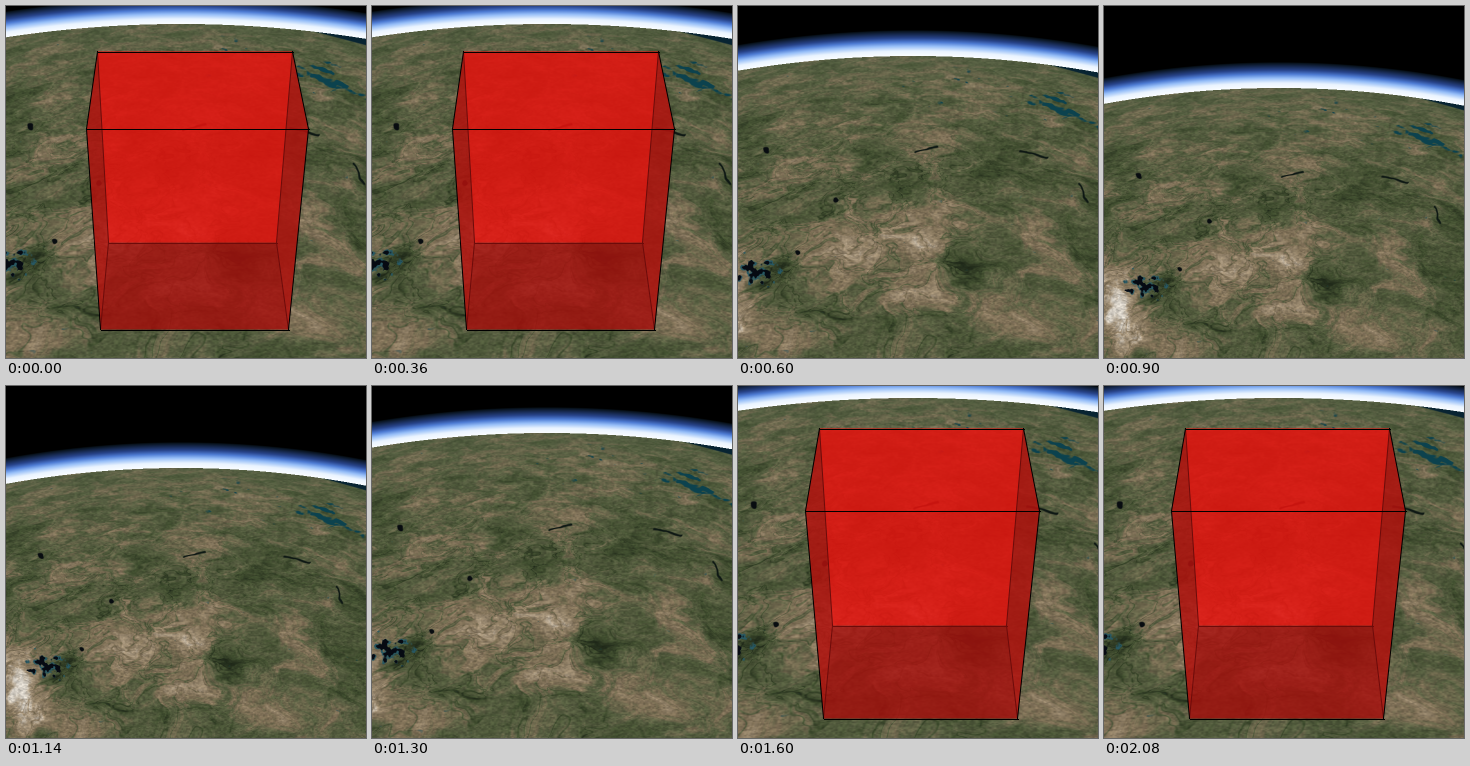
Write a matplotlib script that moves like this. It is 360 by 352 pixels and loops after 2.4 s.

```python
import numpy as np
import matplotlib.pyplot as plt
from matplotlib.animation import FuncAnimation
from matplotlib.patches import Polygon

W, H, DPI = 360, 352, 100
STEP, LOOP = 100, 2400
SS = 2  # supersampling

# camera holds: start ms, horizon height, depth scale, spread, spread per row
VIEWS = [(0, 18, .904, 1.026, -.00048),
         (600, 50, 1, 1, 0),
         (900, 82, 1.08, .95, .00105),
         (1300, 47, .99, 1, 0),
         (1600, 12, .87, .993, -.0006)]
BASE = VIEWS[1]

# box edges running across the screen: y, left x, right x
# (top back, top front, bottom front, bottom back)
BOXES = {0: [(45, 91, 286), (122.5, 80, 302), (323, 94, 282), (236, 102, 270)],
         4: [(42, 81, 285), (124.5, 67, 301), (332, 85, 279), (239, 94, 268)]}

# ground regions: x, y, half width, half height
DRY = [(60, 165, 45, 10), (185, 205, 40, 10), (115, 240, 45, 18),
       (195, 240, 40, 14), (62, 335, 32, 16), (180, 290, 35, 10),
       (290, 315, 45, 22)]
LUSH = [(40, 270, 13, 45), (14, 140, 22, 22), (115, 184, 50, 8),
        (222, 300, 13, 38), (270, 200, 30, 9), (115, 316, 40, 7)]
PONDS = [(60, 246), (98, 195), (29, 144)]
RIVERS = [(178, 147, 200, 141), (284, 145, 311, 151), (341, 178, 350, 196)]

SOIL = [(.05, 34, 44, 27), (.28, 63, 76, 46), (.47, 87, 94, 65),
        (.66, 126, 111, 86), (.86, 158, 141, 116), (1.1, 212, 206, 196)]
AIR = [(0, 250, 253, 255), (5, 234, 244, 255), (10, 150, 190, 248),
       (14, 78, 124, 212), (18, 40, 68, 138), (25, 8, 18, 28), (26, 0, 0, 0)]

LATTICE = np.random.default_rng(11).uniform(-1, 1, (256, 256))


def noise(x, y, seed=0):
    x, y = x + seed * 37.3, y + seed * 71.9
    i, j = np.floor(x).astype(int), np.floor(y).astype(int)
    u, v = x - i, y - j
    u, v = u * u * (3 - 2 * u), v * v * (3 - 2 * v)
    i, j, i1, j1 = i & 255, j & 255, (i + 1) & 255, (j + 1) & 255
    top = LATTICE[j, i] * (1 - u) + LATTICE[j, i1] * u
    low = LATTICE[j1, i] * (1 - u) + LATTICE[j1, i1] * u
    return top * (1 - v) + low * v


def fractal(x, y, px, cell, octaves, seed):
    """Layered noise; detail finer than a pixel fades out."""
    total, amp = 0, .5
    for k in range(octaves):
        fade = np.clip(cell / px - .2, 0, 1)
        total = total + amp * fade * noise(x / cell, y / cell, seed + k)
        cell, amp = cell / 2, amp * .78
    return total


def ramp(t, stops):
    at, *channels = np.array(stops).T
    return np.stack([np.interp(t, at, c) for c in channels], -1)


def blob(x, y, cx, cy, w, h):
    return np.exp(-((x - cx) / w) ** 2 - ((y - cy) / h) ** 2)


def segment(x, y, x0, y0, x1, y1):
    """Distance to a straight stroke."""
    dx, dy = x1 - x0, y1 - y0
    t = np.clip(((x - x0) * dx + (y - y0) * dy) / (dx * dx + dy * dy), 0, 1)
    return np.hypot(x - x0 - t * dx, y - y0 - t * dy)


def horizon(x, view):
    return view[1] + .00048 * view[2] * (x - 175) ** 2


def paint(img, color, mask):
    return img + (np.array(color) - img) * np.clip(mask, 0, 1)[..., None]


def soil(x, y, jx, jy, dy):
    z = 120 / (dy + 110)
    gx, gy, px = (x - 190) * z, 500 * z, 500 * z / (dy + 110)
    wx = gx + 9 * noise(gx / 14, gy / 14, 21) + 3 * noise(gx / 5, gy / 5, 22)
    wy = gy + 9 * noise(gx / 14, gy / 14, 23) + 3 * noise(gx / 5, gy / 5, 24)

    t = .5 + .3 * fractal(wx, wy, px, 24, 6, 1)
    t += .15 * sum(blob(jx, jy, *d) for d in DRY)
    t -= .17 * sum(blob(jx, jy, *d) for d in LUSH)
    t += .6 * blob(jx, jy, -18, 292, 24, 36)
    plains = np.clip((jx - 215) / 40, 0, 1)
    t -= .05 * plains

    # dark winding ridges, mostly in the western mountains
    rough = np.clip((dy - 45) / 70, 0, 1) * (1 - .8 * plains)
    fold = fractal(wx, wy, px, 16, 4, 9)
    t -= .2 * rough * np.exp(-(fold / .07) ** 2)

    img = ramp(t, SOIL)
    grain = noise(x / 3.5, y / 1.6, 15) + noise(x / 1.8, y / 1.1, 16)
    img *= (1 + .11 * grain)[..., None]
    return paint(img, (84, 96, 68), .45 * np.exp(-dy / 35))


def water(img, x, y, jx, jy):
    # chain of lakes, tilted towards the east
    slope = y - 103 - .32 * (x - 325)
    chain = blob(x, slope, 325, 0, 34, 12) + .18 * blob(x, y, 230, 80, 140, 25)
    shore = noise(jx / 13, slope / 4, 41) + .4 * noise(jx / 4, jy / 2, 42)
    img = paint(img, (12, 66, 78), 3 * (shore + 1.35 * chain - 1.15))

    # salt lake with shallow margins
    basin = 1 - np.hypot((x - 18) / 14, (y - 267) / 10)
    basin += .9 * noise(x / 6, y / 5, 43) + .3 * noise(x / 2, y / 2, 44)
    shallow = noise(x / 7, y / 5, 45)
    img = paint(img, (40, 88, 98), 4 * (basin + .25 + .4 * shallow))
    img = paint(img, (6, 10, 18), 5 * basin)

    for px, py in PONDS:
        img = paint(img, (8, 12, 16), 3.2 - np.hypot(jx - px, jy - py))
    for river in RIVERS:
        img = paint(img, (14, 24, 20), 1.5 - segment(jx, jy, *river))
    sea = np.minimum(60 + .27 * (x - 316) - y, (x - 312) / 3)
    return paint(img, (8, 36, 50), sea + .5)


def ground(x, y):
    dy = np.maximum(y - horizon(x, BASE), 0)
    # wobble outlines so that regions and shores look natural
    jx = x + 8 * noise(x / 15, y / 8, 31) + 2 * noise(x / 4, y / 3, 32)
    jy = y + 5 * noise(x / 15, y / 8, 33) + 1.5 * noise(x / 4, y / 3, 34)
    img = soil(x, y, jx, jy, dy)
    return water(img, x, y, x + .3 * (jx - x), y + .3 * (jy - y))


def render(view):
    _, top, depth, spread, slope = view
    x, y = np.meshgrid((np.arange(W * SS) + .5) / SS,
                       (np.arange(H * SS) + .5) / SS)
    edge = horizon(x, view)
    bx = 190 + (x - 190) * (spread + slope * (y - top))
    by = horizon(bx, BASE) + (y - edge) * depth
    img = np.where((y < edge)[..., None], ramp(edge - y, AIR), ground(bx, by))
    img = img.reshape(H, SS, W, SS, 3).mean((1, 3))
    return np.clip(img, 0, 255).astype(np.uint8)


fig = plt.figure(figsize=(W / DPI, H / DPI), dpi=DPI, facecolor="black")
ax = fig.add_axes([0, 0, 1, 1])
ax.axis("off")

scenes = [render(v) for v in VIEWS]
picture = ax.imshow(scenes[0], extent=(0, W, H, 0), interpolation="nearest",
                    aspect="auto")
ax.set_xlim(0, W)
ax.set_ylim(H, 0)


def make_box(rows):
    """Translucent faces from back to front, then the edges."""
    left = [(x0 + .5, y + .5) for y, x0, _ in rows]
    right = [(x1 + .5, y + .5) for y, _, x1 in rows]
    parts = []

    def face(pts, rgb, alpha):
        parts.append(ax.add_patch(Polygon(
            pts, facecolor=np.array(rgb) / 255, alpha=alpha, linewidth=0)))

    def band(a, b):
        return [left[a], right[a], right[b], left[b]]

    face(band(0, 3), (220, 20, 15), .75)
    for side in (left, right):
        face(side, (100, 15, 12), .7)
    face(band(3, 2), (62, 8, 8), .65)
    face(band(1, 2), (230, 20, 15), .5)
    face(band(0, 1), (230, 20, 15), .52)

    def line(a, b, color):
        parts.extend(ax.plot(*zip(a, b), color=color, lw=72 / DPI))

    for side in (left, right):
        line(side[0], side[3], "#6d0b0a")
        line(side[3], side[2], "#6d0b0a")
        line(side[0], side[1], "black")
        line(side[1], side[2], "black")
    for k in range(4):
        line(left[k], right[k], "#6d0b0a" if k == 3 else "black")
    return parts


boxes = {k: make_box(rows) for k, rows in BOXES.items()}


def update(i):
    now = i * STEP
    k = max(n for n, v in enumerate(VIEWS) if v[0] <= now)
    picture.set_data(scenes[k])
    for owner, parts in boxes.items():
        for part in parts:
            part.set_visible(owner == k)
    return [picture]


anim = FuncAnimation(fig, update, frames=LOOP // STEP, interval=STEP,
                     init_func=lambda: update(0), repeat=True, repeat_delay=0)
plt.show()
```
